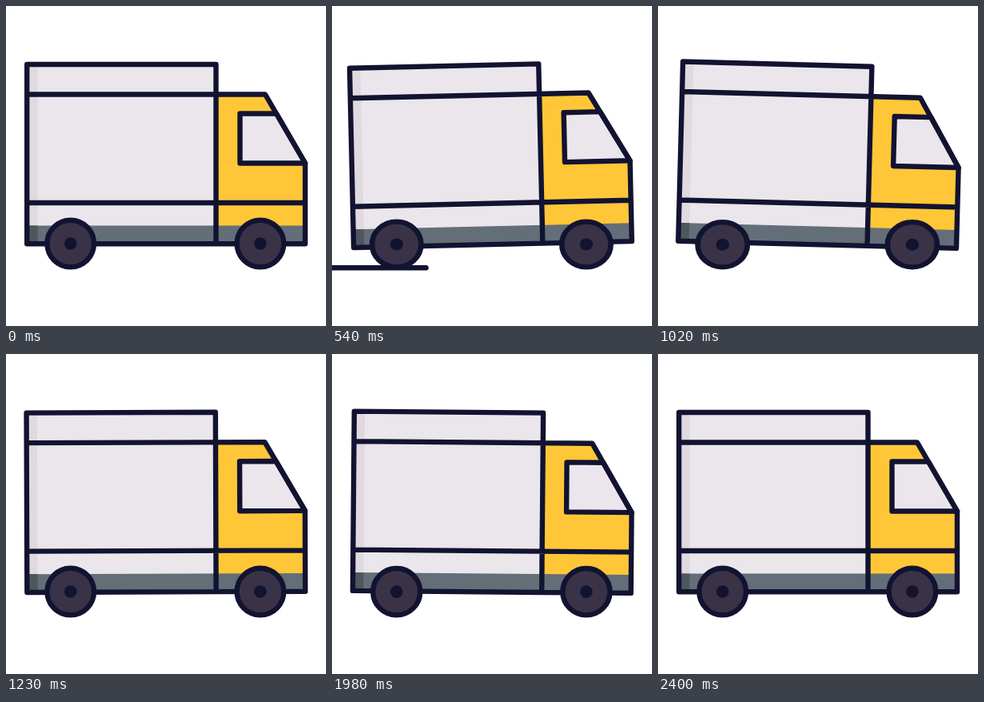
These frames come from a looping animation (400 by 400 pixels, 2430 ms). An HTML page:

```html
<!DOCTYPE html>
<html lang="en">
<head>
<meta charset="utf-8">
<title>Delivery truck</title>
<style>
  html, body { margin: 0; width: 100%; height: 100%; overflow: hidden; background: #fff; }
  svg { display: block; width: 100%; height: 100%; }
  .ink { stroke: #121331; stroke-width: 6.4; stroke-linecap: round; stroke-linejoin: round; }
</style>
</head>
<body>
<svg viewBox="0 0 400 400">
  <path id="road" class="ink" d="M0 327.2H291.5"/>
  <g id="truck">
    <path fill="#ebe6ec" d="M26 73H262.5V297H26Z"/>
    <path fill="#e0d9e0" d="M26 113H39.5V275H26ZM26 76H39.5V110H26Z"/>
    <path fill="#ffc738" d="M262.5 110.5H324L374 196V297H262.5Z"/>
    <path fill="#646e78" d="M26 274.5H374V297H26Z"/>
    <path fill="#4e565e" d="M26 274.5H39.5V297H26Z"/>
    <path class="ink" fill="#ebe6ec" d="M292.5 134.5H338L374 196.5H292.5Z"/>
    <path class="ink" fill="none" d="M26.2 73H262.5V297.3H26.2ZM26.2 110.5H324L374 196.5V297.3H262.5M26.2 246H374"/>
  </g>
  <g class="wheel" data-x="80.7"></g>
  <g class="wheel" data-x="317.9"></g>
</svg>
<script>
  const STEP = 30, FRAMES = 81, TILT = 1.5;
  // Rocking extremes: [frame, direction]
  const rocking = [[0, 0], [6.75, 1], [20.25, -1], [33.75, 1], [47.1, -1], [60.75, 1], [74.1, -1], [80, 0], [81, 0]];
  const road = document.getElementById('road');
  const truck = document.getElementById('truck');
  const wheels = [...document.querySelectorAll('.wheel')];

  for (const wheel of wheels) {
    wheel.innerHTML = '<circle class="ink" cy="-32.4" r="29.3" fill="#3a3347"/>' +
      '<circle cy="-32.4" r="7.8" fill="#121331"/>';
  }

  function rockAt(frame) {
    const i = rocking.findIndex(key => key[0] > frame);
    const [start, from] = rocking[i - 1], [end, to] = rocking[i];
    const u = (frame - start) / (end - start);
    return from + (to - from) * (1 - Math.cos(Math.PI * u)) / 2;
  }

  function draw(frame) {
    const rock = rockAt(frame), squash = rock * rock;
    truck.setAttribute('transform', `translate(0 ${squash}) rotate(${rock * TILT} 200 260)`);
    for (const wheel of wheels) {
      wheel.setAttribute('transform',
        `translate(${wheel.dataset.x} 329.4) scale(${1 + 0.06 * squash} ${1 - 0.04 * squash})`);
    }
    // The road dash passes from right to left twice per loop
    const pass = frame < 80 ? frame % 40 : 0;
    road.setAttribute('transform', `translate(${438 - 34 * pass})`);
  }

  function tick() {
    draw(Math.floor(performance.now() / STEP) % FRAMES);
    requestAnimationFrame(tick);
  }
  tick();
</script>
</body>
</html>
```
